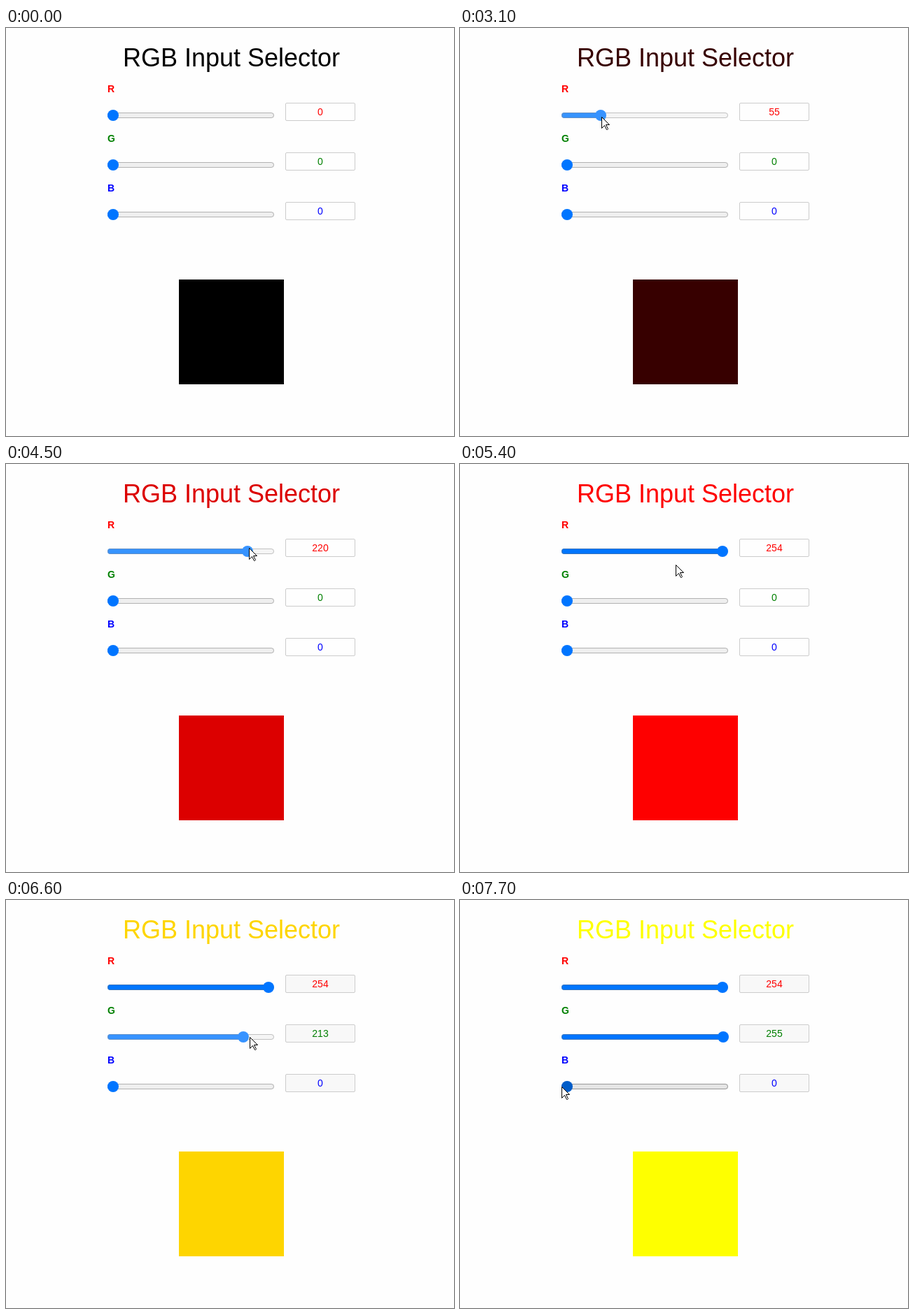
These frames come from a looping animation (640x584 px, 8 s). An HTML page with a canvas:

```html
<!DOCTYPE html>
<html lang="en">
<head>
<meta charset="utf-8">
<title>RGB Input Selector</title>
<style>
html, body { margin: 0; width: 100%; height: 100%; overflow: hidden; background: #fefefe; }
canvas { display: block; }
</style>
</head>
<body>
<canvas id="stage" width="640" height="584"></canvas>
<script>
const ctx = document.getElementById('stage').getContext('2d', { alpha: false });
const LOOP = 8000, STEP = 100;
const FONT = '"Liberation Sans", Arial, sans-serif';
const PAPER = '#fefefe';

const rows = [
  { label: 'R', color: '#ff0000', y: 125 },
  { label: 'G', color: '#008000', y: 196 },
  { label: 'B', color: '#0000ff', y: 267 }
];

const skins = {
  idle: { accent: '#0075ff', track: '#efefef', edge: 'rgba(118,118,118,0.5)' },
  hover: { accent: '#005cc8', track: '#e5e5e5', edge: 'rgba(79,79,79,0.5)' },
  active: { accent: '#3793ff', track: '#f5f5f5', edge: 'rgba(141,141,141,0.5)' }
};

const part = (t, from, to) => Math.min(1, Math.max(0, (t - from) / (to - from)));
const lerp = (a, b, u) => a + (b - a) * u;
const easeOut = u => 1 - (1 - u) ** 2.6;
const easeInOut = u => u ** 3 * (6 * u * u - 15 * u + 10);

// Red is nudged up and back, then swept to the right; green is one sweep past the end.
const redAt = t => 55 * Math.sin(Math.PI * part(t, 2300, 3900)) ** 2
  + 254 * easeOut(part(t, 3800, 5100));
const greenAt = t => 270 * easeInOut(part(t, 6161, 6820));

const thumbX = v => 153 + v * 223 / 255;
const pressedRow = t => t >= 1700 && t <= 5100 ? 0 : t >= 6000 && t <= 6800 ? 1 : -1;

function glide(u, from, to, bend = [0, 0]) {
  const s = u * u * (3 - 2 * u);
  return from.map((a, i) => lerp(a, to[i], s) + bend[i] * Math.sin(Math.PI * s));
}

function pointer(t) {
  const red = redAt(t), green = greenAt(t);
  let p;
  if (t < 500) return null;
  if (t < 1700) p = glide(part(t, 500, 1300), [459, 233], [153, 127], [-243, -133]);
  else if (t <= 5100) p = [thumbX(red) + red / 110, lerp(127, 120, part(t, 3800, 4500))];
  else if (t < 6000) p = glide(part(t, 5100, 5900), [378, 120], [158, 195]);
  else if (t <= 6800) p = [thumbX(green) + 5.5 + green / 70, 196];
  else p = glide(part(t, 6800, 7700), [398, 196], [145, 267]);
  return { x: Math.round(p[0]), y: Math.round(p[1]) };
}

function fillRound(x, y, w, h, r, color) {
  ctx.beginPath();
  ctx.roundRect(x, y, w, h, r);
  ctx.fillStyle = color;
  ctx.fill();
}

function strokeRound(x, y, w, h, r, color) {
  ctx.beginPath();
  ctx.roundRect(x + 0.5, y + 0.5, w - 1, h - 1, r);
  ctx.strokeStyle = color;
  ctx.stroke();
}

function text(str, x, y, font, color, align) {
  ctx.font = font + ' ' + FONT;
  ctx.textAlign = align;
  ctx.fillStyle = color;
  ctx.fillText(str, x, y);
}

// The translucent edge also tints the filled part of the track.
function drawSlider(y, value, skin) {
  const x = Math.round(thumbX(value)), top = y - 4;
  fillRound(145, top, 238, 8, 4, skin.track);
  fillRound(145, top, x - 145, 8, [4, 0, 0, 4], skin.accent);
  strokeRound(145, top, 238, 8, 3.5, skin.edge);
  fillRound(x - 8, y - 8, 16, 16, 8, skin.accent);
}

function drawPointer(p) {
  const pts = [[0, 0], [0, 16], [4, 12], [7, 18], [8, 18], [9, 17], [6, 11], [11, 11]];
  ctx.beginPath();
  for (const [x, y] of pts) ctx.lineTo(p.x + x + 0.5, p.y + y + 0.5);
  ctx.closePath();
  ctx.fillStyle = '#fff';
  ctx.fill();
  ctx.strokeStyle = '#000';
  ctx.stroke();
}

function draw(t) {
  const values = [redAt(t), greenAt(t), 0].map(v => Math.min(255, Math.round(v)));
  const color = `rgb(${values.join(',')})`;
  const tip = pointer(t), pressed = pressedRow(t);
  const field = values[1] > 50 ? '#f8f8f8' : PAPER;

  ctx.lineWidth = 1;
  ctx.lineJoin = 'round';
  ctx.fillStyle = PAPER;
  ctx.fillRect(0, 0, 640, 584);
  text('RGB Input Selector', 322, 55, '36px', color, 'center');

  rows.forEach((row, i) => {
    const over = tip && tip.x >= 145 && tip.x < 383 && Math.abs(tip.y - row.y) <= 8;
    const state = pressed === i ? 'active' : pressed < 0 && over ? 'hover' : 'idle';
    text(row.label, 145, row.y - 33, 'bold 14px', row.color, 'left');
    drawSlider(row.y, values[i], skins[state]);
    fillRound(399, row.y - 18, 100, 26, 2, field);
    strokeRound(399, row.y - 18, 100, 26, 1.5, '#cccccc');
    text(String(values[i]), 449, row.y, '14px', row.color, 'center');
  });

  ctx.fillStyle = color;
  ctx.fillRect(247, 360, 150, 150);
  if (tip) drawPointer(tip);
}

const start = performance.now();
function tick() {
  const t = (performance.now() - start) % LOOP;
  draw(Math.floor(t / STEP) * STEP);
  requestAnimationFrame(tick);
}
tick();
</script>
</body>
</html>
```
